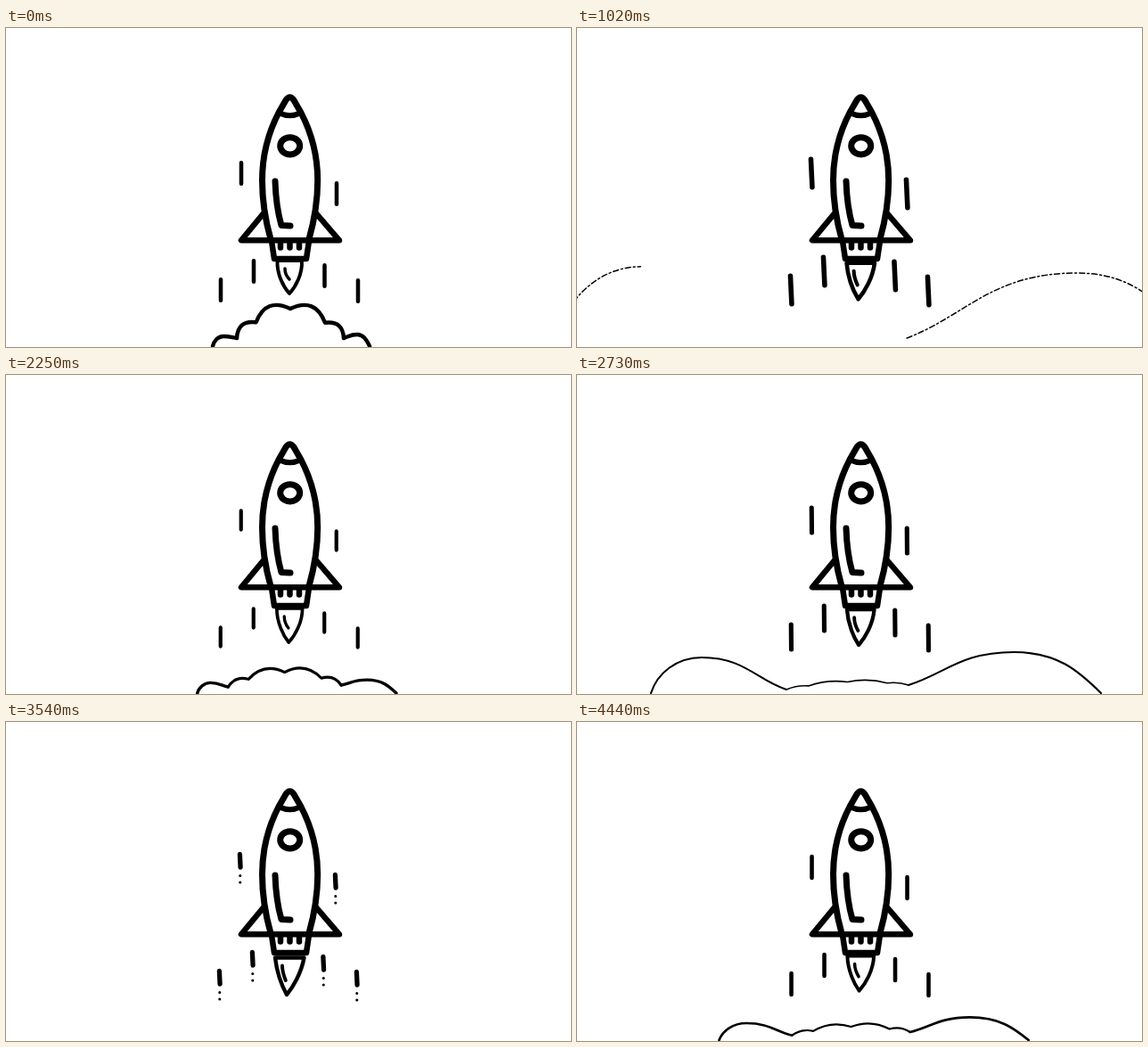
Animation, 634 px wide and 358 px high, one loop 4.5 s. Source, as an HTML page:

```html
<!DOCTYPE html>
<html lang="en">
<head>
<meta charset="utf-8">
<title>Rocket launch</title>
<style>
html, body { margin: 0; width: 100%; height: 100%; overflow: hidden; background: #fff; }
svg { display: block; width: 100%; height: 100%; }
</style>
</head>
<body>
<svg viewBox="0 0 634 358" fill="none" stroke="#000" stroke-linecap="round" stroke-linejoin="round">
  <g id="cloud">
    <path id="edges"/>
    <path id="bumps"/>
  </g>
  <path id="streaks"/>
  <path id="drops" stroke-width="3"/>
  <path id="flame"/>
  <path id="glint"/>
  <g stroke-width="7">
    <path d="M297 237C290.500 214 287.500 193 287.500 171C287.500 143 294 118 306 95L314 81Q318.500 74.500 323 81L331 95C343 118 349.700 143 349.700 171C349.700 193 346.500 214 340 237"/>
    <path d="M307 95.500Q318.500 101 330 95.500" stroke-width="6"/>
    <ellipse cx="318.700" cy="132.300" rx="11" ry="9.600"/>
    <path d="M302 172Q303 201 309 221.500L319 222"/>
    <path d="M289 208L264 238.300L374 238.300L348 208" stroke-width="6.500"/>
    <path d="M298 239L301 259H337L340 239" stroke-width="6.500"/>
    <path d="M308 240V246.500M318.500 240V246.500M329 240V246.500" stroke-width="6.500"/>
  </g>
</svg>
<script>
const LOOP = 4500, BURST = 1920, STEP = 30;
const SPREAD = 810;  // time for the cloud to reach its wide shape
const THIN = 900;    // the cloud breaks into dashes
const CLEAR = 1260;  // the cloud is gone
const BREAK = 1400;  // the streaks break into drops
const streakAt = [[264, 163], [371, 186], [278, 273], [357.5, 278], [241, 294], [395, 295]];

const set = (id, d, width) => {
  const path = document.getElementById(id);
  path.setAttribute("d", d);
  if (width) path.setAttribute("stroke-width", width);
};

// Control points from a puff's foot up to its level top.
function half([fx, fy], [tx, ty], lean, rise) {
  const dx = tx - fx, dy = ty - fy;
  return [`${fx + lean * dx} ${fy + rise * dy}`, `${tx - 0.5 * dx} ${ty}`];
}
const climb = (foot, top, lean, rise) =>
  `M${foot.join(" ")}C${half(foot, top, lean, rise).join(" ")} ${top.join(" ")}`;
const descend = (top, foot, lean, rise) =>
  `C${half(foot, top, lean, rise).reverse().join(" ")} ${foot.join(" ")}`;

// Small puffs that ride on an arch which sinks as the cloud spreads.
function arch([ax, ay], [bx, by], g) {
  const height = 6 + 27 * (1 - g) ** 2;
  const bulge = 0.06 + 0.21 * (1 - g);
  let x = ax, y = ay, d = `M${x} ${y}`;
  for (const f of [0.18, 0.5, 0.825, 1]) {
    const ex = ax + (bx - ax) * f;
    const ey = ay + (by - ay) * f - height * Math.sin(Math.PI * f);
    const cx = (x + ex) / 2 + 2 * bulge * (ey - y);
    const cy = (y + ey) / 2 - 2 * bulge * (ex - x);
    d += `Q${cx} ${cy} ${ex} ${ey}`;
    x = ex;
    y = ey;
  }
  return d;
}

function drawCloud(u) {
  const cloud = document.getElementById("cloud");
  cloud.style.display = u < CLEAR ? "" : "none";
  const g = u / SPREAD, thin = u > THIN;
  const grow = (from, to, power) => from + (to - from) * g ** power;

  const leftFoot = [grow(232, 83, 2.4), 357];
  const leftTop = [grow(244, 140, 2.2), grow(346, 317, 4.3)];
  const leftDip = [grow(259, 235, 1), grow(348, 353, 1)];
  const rightDip = [grow(379, 372, 1), 348];
  const rightTop = [grow(394, 490, 2.4), grow(344, 311, 3.2)];
  const rightFoot = [grow(408, 588, 2), 357];

  const left = climb(leftFoot, leftTop, 0.12, 0.55) + (thin ? "" : descend(leftTop, leftDip, 0.35, 0.3));
  const right = climb(rightDip, rightTop, 0.35, 0.35) + descend(rightTop, rightFoot, 0.26, 0.55);
  const ink = Math.max(0.8, 4.4 - 2.3 * g);
  set("edges", left + right, ink);
  set("bumps", thin ? "" : arch(leftDip, rightDip, g), ink * (1 - 0.25 * g));
  cloud.setAttribute("stroke-dasharray", thin ? "6 3 2 3" : "none");
}

function drawStreaks(u, swell) {
  const length = 32 + 6 * swell, broken = u > BREAK;
  const tilt = Math.max(0, swell), shift = 1.5 * u / BURST;
  let lines = "", drops = "";
  for (const [x0, y] of streakAt) {
    const x = x0 - shift, top = y - length / 2;
    const end = top + length * (broken ? 0.58 : 1);
    lines += `M${x - tilt} ${top + 2.5}L${x + tilt} ${end - 2.5}`;
    drops += `M${x} ${top + length * 0.78}h.1M${x} ${top + length}h.1`;
  }
  set("streaks", lines, 5 + 0.8 * swell);
  set("drops", broken ? drops : "");
}

// The flame stretches from a round drop into a pointed cone.
function drawFlame(u, swell) {
  const q = Math.min(1, u / 1300), round = 1 - 0.6 * q;
  const l = 304.5 - 2.5 * q, r = 332 + 2.5 * q, top = 261 + 3.5 * q;
  const x = 318 - 3 * q, y = 298 + 8 * q, h = y - top;
  const side = s => [
    `${s + (x - s) * (0.3 - 0.35 * round)} ${top + h * 0.42}`,
    `${x + (s - x) * (0.25 + 0.25 * round)} ${top + h * 0.8}`
  ];
  const a = side(l), b = side(r), width = 4.2 + 0.5 * swell;
  set("flame", `M${l} ${top}C${a.join(" ")} ${x} ${y}C${b.reverse().join(" ")} ${r} ${top}Z`, width);
  set("glint", `M${x - 5} ${top + 9}Q${x - 5} ${top + 16} ${x + 2 * round - 2} ${y - 16}`, width * 0.9);
}

function draw(ms) {
  const u = Math.floor((ms % LOOP) / STEP) * STEP % BURST;
  const swell = Math.cos(2 * Math.PI * (u - 1250) / BURST);
  drawCloud(u);
  drawStreaks(u, swell);
  drawFlame(u, swell);
}

const start = performance.now();
function tick() {
  draw(performance.now() - start);
  requestAnimationFrame(tick);
}
draw(0);
requestAnimationFrame(tick);
</script>
</body>
</html>
```
